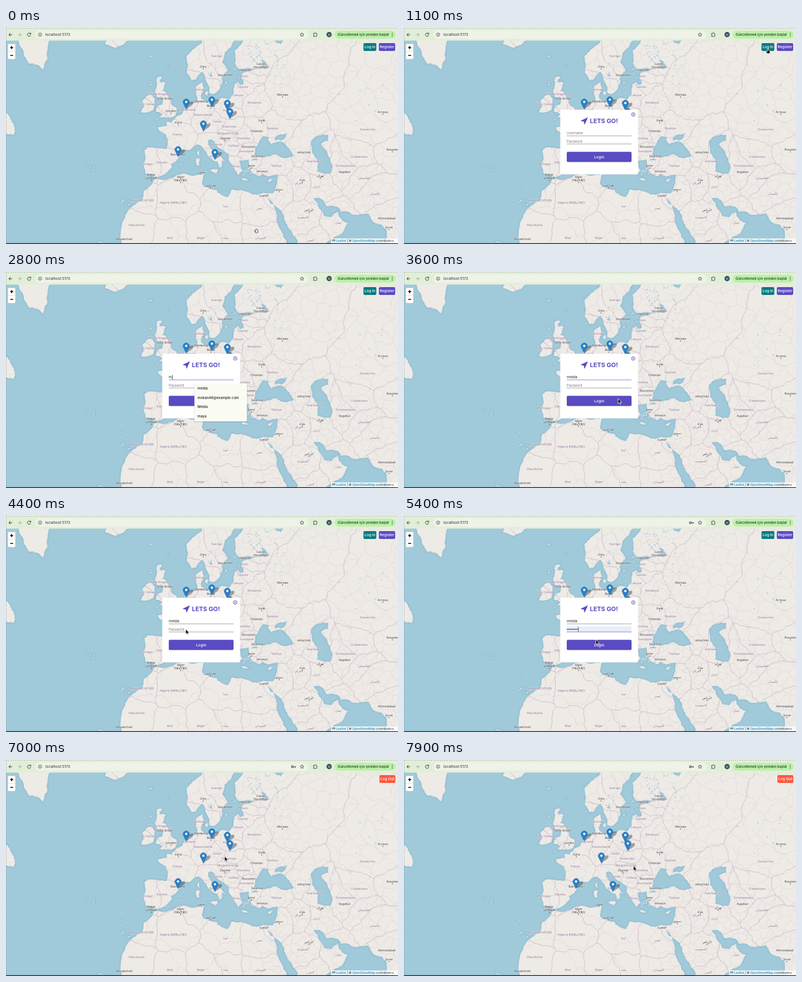
Recreate the animation shown at these times as an HTML page. Size 696 by 386 pixels, loop 8 s.

```html
<!DOCTYPE html>
<html lang="tr">
<head>
<meta charset="utf-8">
<title>Travel map</title>
<style>
html, body { margin: 0; width: 100%; height: 100%; overflow: hidden; background: #a0cada; }
svg { display: block; width: 696px; height: 386px; }
text { font-family: Inter, Roboto, sans-serif; white-space: pre; }
.map text { font-family: "Noto Sans", "DejaVu Sans", sans-serif; text-anchor: middle; paint-order: stroke; stroke: #f6f3f0; stroke-opacity: .6; stroke-width: 1px; }
.land { fill: #eeeae6; fill-rule: evenodd; }
</style>
</head>
<body>
<svg id="stage" viewBox="0 0 696 386"></svg>
<script>
const stage = document.getElementById('stage');

function add(parent, tag, attrs = {}, text) {
  const el = document.createElementNS('http://www.w3.org/2000/svg', tag);
  for (const k in attrs) el.setAttribute(k, attrs[k]);
  if (text !== undefined) el.textContent = text;
  parent.appendChild(el);
  return el;
}
const group = (parent, attrs) => add(parent, 'g', attrs);
const rect = (p, x, y, width, height, fill, rx = 0, more = {}) => add(p, 'rect', { x, y, width, height, fill, rx, ...more });
const line = (p, d, stroke, width = 1, more = {}) => add(p, 'path', { d, stroke, 'stroke-width': width, fill: 'none', ...more });
const label = (p, x, y, size, fill, text, more = {}) => add(p, 'text', { x, y, 'font-size': size, fill, ...more }, text);
const show = (el, on) => el.setAttribute('display', on ? 'inline' : 'none');

function rng(seed) {
  return () => (seed = (seed * 16807) % 2147483647) / 2147483647;
}
const rnd = rng(77);

// Web Mercator
function project(lon, lat) {
  const m = Math.log(Math.tan(Math.PI / 4 + lat * Math.PI / 360)) * 180 / Math.PI;
  return [294 + 5.25 * lon, 469 - 5.25 * m];
}

// midpoint displacement: a plain segment becomes a natural line
function rough(a, b, amp) {
  const dx = b[0] - a[0], dy = b[1] - a[1];
  if (Math.hypot(dx, dy) < 4) return [b];
  const k = (rnd() - .5) * amp;
  const mid = [(a[0] + b[0]) / 2 - dy * k, (a[1] + b[1]) / 2 + dx * k];
  return [...rough(a, mid, amp), ...rough(mid, b, amp)];
}
const toPath = pts => 'M' + pts.map(p => p.map(v => v.toFixed(1)).join(' ')).join('L');

function shape(s, amp = .28) {
  const pts = s.trim().split(/\s+/).map(p => project(...p.split(',').map(Number)));
  return toPath(pts.flatMap((p, i) => rough(p, pts[(i + 1) % pts.length], amp))) + 'Z';
}

// edges between neighbouring Voronoi cells
function voronoi(sites, amp) {
  let d = '';
  sites.forEach((s, i) => {
    let cell = [[-50, -50], [750, -50], [750, 450], [-50, 450]].map(p => ({ p, n: -1 }));
    sites.forEach((o, j) => {
      if (i === j) return;
      const side = q => (q[0] - (s[0] + o[0]) / 2) * (o[0] - s[0]) + (q[1] - (s[1] + o[1]) / 2) * (o[1] - s[1]);
      const next = [];
      cell.forEach((a, k) => {
        const b = cell[(k + 1) % cell.length], u = side(a.p), v = side(b.p);
        if (u <= 0) next.push(a);
        if ((u <= 0) !== (v <= 0)) {
          const f = u / (u - v);
          next.push({ p: [a.p[0] + (b.p[0] - a.p[0]) * f, a.p[1] + (b.p[1] - a.p[1]) * f], n: u <= 0 ? j : a.n });
        }
      });
      cell = next;
    });
    cell.forEach((a, k) => {
      if (a.n > i) d += toPath([a.p, ...rough(a.p, cell[(k + 1) % cell.length].p, amp)]);
    });
  });
  return d;
}

// regions are small in Europe and the Near East, wide in the north-east and the desert
function regionSites() {
  const sites = [];
  for (let i = 0; i < 1500; i++) {
    const x = 215 + rnd() * 500, y = rnd() * 400;
    const middle = Math.exp(-(((x - 420) / 150) ** 2) - ((y - 195) / 75) ** 2);
    const east = x > 470 && y > 225 ? .3 : 0;
    const desert = y > 265 && x < 460;
    if (rnd() < (desert ? .05 : .17 + .45 * middle + east)) sites.push([x, y]);
  }
  return sites;
}

const coast = [
  '12,68 10,64 5,62 5.2,59.3 6.7,58 8.2,58.1 10.5,59.5 11.4,58.4 12.8,55.6 14.2,55.4 16.4,56.5 17,58.6 19,59.8 17.2,61 18,62.7 21.5,64.6 22.5,65.7 25,65.3 21.3,62.9 21.4,60.9 23,59.9 29.8,60 24,59.3 23.6,58.5 24.4,57.3 23.1,57.1 22.6,57.7 21.3,57.2 21,55.4 19.7,54.4',
  '17,54.7 14.3,53.9 11,54 9.9,54.8 10.8,56.4 10.5,57.7 8.2,56.8 8.8,54 5.3,53.2 3.6,51.4 1.6,50.8 0,49.5 -1.7,49.7 -1.6,48.7 -4.7,48.5 -4.4,47.9 -2,46.9 -1.2,45.5 -1.6,43.4 -8,43.7 -9.2,43 -8.8,40.8 -9.4,38.8 -8.9,37 -6.4,36.8',
  '-5.6,36 -2.2,36.8 .1,38.7 -.3,39.5 3.2,42 3.1,43.1 6.2,43.1 8.8,44.4 10.2,43.9 12.2,41.7 15.6,40 16.1,38.5 15.7,37.9 17.1,39 16.9,40.4 18.4,39.9 16.1,41.7 14,42.7 12.4,44.3 12.5,45.5 13.7,45.6 16,43.6 19.4,41.9 19.4,40.4 21.3,38 22.5,36.5 23.9,37.7 22.8,40.3 26.1,40.7',
  '26.2,39.5 27.3,37.1 29.5,36.2 30.7,36.9 32.6,36.1 36,36.7 35.5,33.8 34.2,31.3 31,31.5 29,30.9 23.2,32.3 20.2,32.4 19,30.3 15.5,31.6 15.2,32.4 11,33.3 10.2,34.3 11,37 3,36.8 -2,35.2 -5.5,35.9 -9.4,32 -10,29.5 -13,27.7 -16,23.7 -17,21 -16.4,12 80,12 80,68'
];
const seas = [
  '28,41.4 31.3,41.2 35,42 38.5,41 41.5,41.5 39.8,43.5 36.7,45.2 33.6,44.5 32.6,45.5 33,46.1 30.7,46.4 28.7,44',
  '35,45.4 37,45.4 39.2,47.1 35,46.2', '26.7,40.4 28.5,41 29.3,40.7',
  '47.5,43 47,45 49,46.4 53,46.7 53,45.3 50.5,44.5 52.6,42.6 53.7,40.8 53.8,37 49.2,37.5 49.4,40.3',
  '32.6,29.9 35.5,24 37.3,19.5 40,14 42,12.6 42.7,16.5 39,22 36,27 34.6,28 33.4,28.3',
  '48,30 50.2,30 52.5,27.5 56.6,27 57.2,25.8 66.5,25.3 69,22.3 72.6,20.5 74,13 50,13 52.2,15.6 57.5,18.9 59.7,22.5 56.4,24.6 56.2,26 54,24.1 51.5,24.6 50,26.8',
  '34.8,64.5 37,63.9 38,66 35,66', '31,60 32.8,60.4 30.5,61.6', '34.6,62.4 36,60.9 35.6,62', '12.6,58.8 13.8,58.6 13.6,59.3'
];
const islands = [
  '-5.6,50.1 1.3,51.1 1.7,52.6 .1,53.2 -2,55.8 -3.2,56 -2,57.5 -4,57.7 -3.1,58.6 -5,58.5 -5.6,56 -4.9,54.8 -3.2,54.8 -3.1,53.4 -4.6,53.1 -5.2,51.8 -3,51.4',
  '-6.1,52.2 -5.7,54.5 -7.5,55.3 -10,54.1 -9.2,53.1 -10.2,51.7', '-22.5,63.9 -18.7,63.4 -13.7,65.1 -16,66.5 -22.3,66.4 -24,65 -22,64.5',
  '-54,68 -51.5,64 -48.3,60.9 -43.5,59.9 -42,63 -40,65.2 -32,68', '-57,51.6 -55.5,51.5 -53,48.3 -53.3,46.7 -57,47.5',
  '12.5,38 15.5,38.2 15.1,36.8', '8.2,40.9 9.6,41 9.5,39.2 8.5,39', '9.3,43 9.2,41.4 8.6,42.3', '23.6,35.5 26.2,35.2 24.8,35', '32.4,35 34.5,35.6 33.4,34.7', '11.2,55.6 12.5,56 12,55'
];
// lon, lat, count, spread
const isles = [[25.5, 37.5, 12, 1.8], [-27, 38.4, 6, 1.6], [-15.8, 28.4, 6, 2], [-24, 16, 5, 1], [-6.8, 57.5, 4, .8], [-7, 62, 3, .4], [21, 60, 6, .8], [-1.3, 60.3, 2, .3], [3, 39.5, 3, .9], [18.6, 57.6, 2, .4], [22.6, 58.5, 3, .3], [-17, 32.7, 1, .1]];
const lakes = [[27.5, 62.5, 40, 3], [33, 63.5, 12, 2], [14, 60, 8, 2], [64, 53, 14, 9], [36, 59, 8, 4], [60, 45.6, 3, 1.3]];

function scatter([lon, lat, n, spread]) {
  let d = '';
  for (let i = 0; i < n; i++) {
    const [x, y] = project(lon + (rnd() * 2 - 1) * spread, lat + (rnd() - .5) * spread);
    const r = .6 + rnd();
    d += `M${x - r} ${y}L${x} ${y - r * .8}L${x + r * 1.2} ${y - r * .2}L${x} ${y + r}Z`;
  }
  return d;
}

// "name x y" entries
const parse = s => s.split('|').map(e => {
  const w = e.trim().split(' ');
  return [w.slice(0, -2).join(' '), +w[w.length - 2], +w[w.length - 1]];
});
const countries = parse(`Sverige 374 50|Danmark 343 110|United Kingdom 272 118|Éire / Ireland 251 136|Nederland 323 146|Deutschland 350 155|France 304 190
 |Česko 375 167|Polska 393 147|Slovensko 396 176|Magyarország 394 188|România 422 197|Србија 404 210|Hrvatska 373 208|България 427 220|Ελλάς 408 247
 |Italia 368 229|Türkiye 480 246|Україна 473 179|Беларусь 441 133|Lietuva 412 120|Latvija 421 105|Eesti 423 86|España 277 240|Portugal 249 243
 |Maroc ⵍⵎⵖⵔⵉⴱ 241 308|Algérie ⵍⵣⵣⴰⵢⴻⵔ 297 312|Mauritanie 232 352|Mali 291 375|Niger 346 375|Қазақстан 642 181`);
const eastern = parse(`Oʻzbekiston 627 230|Türkmenistan 603 246|Azərbaycan 549 238|ایران 551 283|العراق 520 277|السعودية 527 338|مصر 450 322|ليبيا 390 318
 |السودان 452 375|افغانستان 636 268|پاکستان 655 296|عمان 590 348|اليمن 541 379|تشاد 390 375`);
const capitals = parse(`Oslo 350 69|Helsinki 425 75|Москва 491 119|Chișinău 445 184|تونس 347 257|دمشق 485 288|თბილისი 529 222|Бишкек 686 217|Ahmedabad 676 340`);
const cities = parse(`Stockholm 389 84|Санкт- 453 64|Петербург 453 70|Hamburg 346 131|Berlin 364 139|London 293 148|Paris 306 169|Zagreb 389 197
 |București 431 212|İstanbul 446 229|İzmir 436 246|Antalya 455 256|Київ 454 165|Астана 669 150|Barcelona 305 226|Rabat 258 262|ⴰⵔⴱⴰⵟ 258 268|Alger 310 266
 |ⴷⵣⴰⵢⴻⵔ 310 272|طرابلس 363 281|القاهرة 458 299|بغداد 526 271|تهران 558 264|الرياض 538 325|Aşgabat 601 257|Nouakchott 210 377|Surat 680 356`);

function drawMap() {
  const g = group(stage, { class: 'map' });
  rect(g, 0, 0, 696, 386, '#a0cada');
  const d = shape(coast.join(' '), .2) + seas.concat(islands).map(s => shape(s)).join('') + isles.map(scatter).join('');
  const clip = add(add(g, 'defs'), 'clipPath', { id: 'shore' });
  add(clip, 'path', { d, 'clip-rule': 'evenodd' });
  const round = { 'stroke-linejoin': 'round' };
  line(g, d, '#90b5cd', 4.6, round);
  line(g, d, '#a0cada', 3.6, round);
  line(g, d, '#86b3c8', .8, round);
  add(g, 'path', { d, class: 'land' });

  const inner = group(g, { 'clip-path': 'url(#shore)' });
  line(inner, voronoi(regionSites(), .5), '#d9ced1', .55);
  add(inner, 'path', { d: lakes.map(scatter).join(''), fill: '#a9cfdc' });
  const nations = [...countries, ...eastern, ...capitals].map(([, x, y]) => [x, y]);
  line(inner, voronoi(nations, .3), '#c0adbf', .7);

  [...countries, ...eastern].forEach(([s, x, y]) => label(g, x, y + 2, 5.5, '#8d7599', s));
  [...capitals, ...cities].forEach(([s, x, y]) => {
    label(g, x, y + 2, 5.4, '#3c3c40', s);
    if (s.length < 7) rect(g, x - .8, y + 3.5, 1.6, 1.6, '#666');
  });
  label(g, 282, 127.5, 5, '#444', 'Great Britain', { 'font-style': 'italic' });
}

function drawPin(x, top) {
  const g = group(stage, { transform: `translate(${x} ${top})` });
  add(g, 'path', { d: 'M0 19L4 9Q8 4 12 6Q14 9 9 13Z', fill: '#333', opacity: .4 });
  add(g, 'path', { d: 'M0 19.3L-4.7 9.4A5.6 5.6 0 1 1 4.7 9.4Z', fill: '#2b80c6', stroke: '#246fae', 'stroke-width': .6 });
  add(g, 'circle', { cy: 6.1, r: 2.1, fill: '#fff' });
}

function button(x, w, fill, text) {
  const g = group(stage);
  rect(g, x, 27, w, 14, fill, 2.2);
  label(g, x + w / 2, 36.4, 6.6, '#fff', text, { 'text-anchor': 'middle', 'font-weight': 500 });
  return g;
}

function drawChrome() {
  const dark = '#35393a';
  rect(stage, 0, 0, 696, 22.5, '#e2efd8');
  rect(stage, 52, 4, 485, 15.5, '#eef2e7', 7.7);
  line(stage, 'M11 12H5M8 9L5 12L8 15', dark);
  line(stage, 'M21 12H27M24 9L27 12L24 15', '#a5a9a4');
  line(stage, 'M43.5 10.2A3 3 0 1 0 44 12.6M44 8.5V10.8H41.6', dark);
  add(stage, 'circle', { cx: 60.5, cy: 11.8, r: 2.9, fill: 'none', stroke: dark, 'stroke-width': .8 });
  line(stage, 'M60.5 11.4V13.4M60.5 10V10.7', dark, .8);
  label(stage, 70, 14, 6.5, '#2b2e2c', 'localhost:5173');
  const star = Array.from({ length: 10 }, (_, i) => {
    const a = i * Math.PI / 5, r = i % 2 ? 1.6 : 3.6;
    return [525.5 + r * Math.sin(a), 12 - r * Math.cos(a)];
  });
  line(stage, toPath(star) + 'Z', dark, .75);
  line(stage, 'M546 9.5H548A1 1 0 0 1 550 9.5H551.5V11.3A1 1 0 0 1 551.5 13.3V15H546V13.3A1 1 0 0 0 546 11.3Z', dark, .9);
  add(stage, 'circle', { cx: 573.7, cy: 11.8, r: 4.7, fill: '#36505b' });
  label(stage, 573.7, 13.6, 4.8, '#dce7ea', 'M', { 'text-anchor': 'middle' });
  rect(stage, 583.5, 5, 108, 14, '#bdf0ab', 7);
  label(stage, 589, 14, 5.9, '#173a18', 'Güncellemek için yeniden başlat', { 'font-weight': 500 });
  for (let i = -1; i < 2; i++) add(stage, 'circle', { cx: 685.8, cy: 11.8 + i * 2.6, r: .75, fill: '#173a18' });
  line(stage, 'M0 .5H696M.5 0V386', '#555', .8, { 'stroke-dasharray': '2 2', opacity: .45 });
  rect(stage, 0, 384.6, 696, 1.4, '#252525');
}

function drawControls() {
  rect(stage, 3, 28, 14, 28, '#fff', 2, { stroke: '#b9b9b5', 'stroke-width': .9 });
  line(stage, 'M3 42H17', '#ccc', .6);
  line(stage, 'M7.2 35H12.8M10 32.2V37.8M7.4 49H12.6', '#000', 1.6);
  rect(stage, 577, 376, 119, 8.6, '#fff', 0, { opacity: .75 });
  rect(stage, 579, 378.2, 5.6, 1.9, '#4c7be1');
  rect(stage, 579, 380.1, 5.6, 1.9, '#ffd500');
  const t = label(stage, 586, 382.4, 5.45, '#333', '');
  [['Leaflet', '#0078a8'], [' | © ', '#333'], ['OpenStreetMap', '#0078a8'], [' contributors', '#333']].forEach(([s, fill]) => add(t, 'tspan', { fill }, s));
}

const violet = '#5a4bc2', grey = '#8b8b8b', focus = '#7468cf';

drawMap();
[[365.5, 122], [320, 126], [393, 128], [397.5, 143], [350.5, 165], [305.5, 211], [371, 216]].forEach(p => drawPin(...p));
drawChrome();
drawControls();

const keyIcon = group(stage);
add(keyIcon, 'circle', { cx: 508.5, cy: 12, r: 1.7, fill: 'none', stroke: '#35393a', 'stroke-width': 1.1 });
line(keyIcon, 'M510.3 12H514.6M513.5 12V13.8', '#35393a', 1.1);

const logIn = button(634.7, 22.8, '#087a80', 'Log In');
const register = button(662, 29, violet, 'Register');
const logOut = button(663, 28.3, '#ff583e', 'Log Out');

const modal = group(stage);
rect(modal, 277.5, 146, 138, 115.5, '#fff', 2.5);
add(modal, 'circle', { cx: 407, cy: 154.5, r: 3.2, fill: 'none', stroke: violet, 'stroke-width': .9 });
line(modal, 'M405.7 153.2L408.3 155.8M408.3 153.2L405.7 155.8', violet, .9);
add(modal, 'path', { d: 'M326 160.3L320.6 172.3L319.6 167L314.2 165.8Z', fill: violet, stroke: violet, 'stroke-width': .7, 'stroke-linejoin': 'round' });
label(modal, 330, 170, 10.9, violet, 'LETS GO!', { 'font-weight': 700 });
const passFill = rect(modal, 289, 197.3, 115, 9.8, '#e7eefb');
const userLine = line(modal, 'M289 192.8H404', grey, .8);
const passLine = line(modal, 'M289 207.2H404', grey, .8);
const user = label(modal, 289, 190.4, 6.3, '#222', '');
const passHint = label(modal, 289, 204.8, 5.9, '#757575', 'Password');
const dots = group(modal);
for (let i = 0; i < 8; i++) add(dots, 'circle', { cx: 290.3 + i * 2.5, cy: 202.4, r: .95, fill: '#222' });
const caret = rect(modal, 289, 184, .7, 8.4, '#111');
rect(modal, 289, 221.3, 115, 18.3, violet, 2);
label(modal, 346.5, 232.9, 6.8, '#fff', 'Login', { 'text-anchor': 'middle', 'font-weight': 500 });

const entries = ['melda', 'mokan48@example.com', 'Melda', 'maya', 'selin', 'tarik'];
const rowHeight = 16.55;
const menu = group(stage);
const menuShade = rect(menu, 333.8, 199.5, 94.8, 69, '#000', 2, { opacity: .13 });
const menuBox = rect(menu, 334.5, 199, 93.3, 68, '#fafcf3', 2);
const rows = entries.map((_, i) => label(menu, 340, 210.2 + i * rowHeight, 6.2, '#1d201d', '', { 'font-weight': 500 }));

// path, fill, stroke
const looks = {
  arrow: ['M0 0V9.4L2.2 7.4L3.6 10.6L5.1 10L3.7 6.9H6.6Z', '#111', '#fff'],
  hand: ['M-3 .6L-2 .2L-1 1.6V-2Q-.5 -2.8 0 -2V-2.5Q.7 -3.3 1.3 -2.3V-2Q2 -2.7 2.5 -1.7V-.8Q3.3 -1.3 3.5 -.3V2L2.5 4H-1Z', '#eeece9', '#333'],
  point: ['M0 0Q1 -.6 1.5 .3V3.4L5 4.4V7L4 9.8H0L-3 5.8L-2 5L0 6.2Z', '#1b1b1b', '#eee'],
  beam: ['M-1.5 -4H1.5M0 -4V4M-1.5 4H1.5', 'none', '#222']
};
const cursor = group(stage);
const pointers = Object.entries(looks).map(([name, [d, fill, stroke]]) =>
  [name, add(cursor, 'path', { d, fill, stroke, 'stroke-width': .8, 'stroke-linejoin': 'round' })]);

// time, x, y, pointer shape from that time on
const moves = [
  [0, 444, 362, 'hand'], [900, 645, 36, 'point'], [1200, 645, 36, 'arrow'], [2100, 306, 189, 'beam'], [2800, 306, 189, ''],
  [3600, 380, 226, 'arrow'], [3900, 319, 202, 'arrow'], [4600, 319, 202, 'arrow'], [5000, 336, 237, 'arrow'], [5300, 340.5, 220.5, 'arrow'],
  [5500, 340.5, 220.5, 'arrow'], [5700, 342, 231, 'point'], [6000, 342.5, 234, 'hand'], [6400, 342.5, 234, 'arrow'], [7300, 404, 150, 'arrow'],
  [7700, 407.3, 188.8, 'arrow'], [8000, 407.3, 188.8, 'arrow']
];

function placeCursor(t) {
  const i = moves.findIndex((m, n) => t >= m[0] && t < moves[n + 1][0]);
  const [t0, x0, y0, look] = moves[i], [t1, x1, y1] = moves[i + 1];
  const u = (t - t0) / (t1 - t0), e = u * u * (3 - 2 * u);
  cursor.setAttribute('transform', `translate(${x0 + (x1 - x0) * e} ${y0 + (y1 - y0) * e})`);
  pointers.forEach(([name, el]) => show(el, name === look));
}

function drawMenu(t, typed) {
  show(menu, t >= 2200 && t < 3300);
  const hits = entries.filter(s => s.toLowerCase().startsWith(typed));
  rows.forEach((r, i) => r.textContent = hits[i] || '');
  const h = hits.length * rowHeight + 1.8;
  menuBox.setAttribute('height', h);
  menuShade.setAttribute('height', h + 1);
}

function render(now) {
  const t = Math.floor(now % 8000 / 100) * 100;
  const logged = t >= 6000, filled = t >= 5000;
  const typed = t < 2800 ? '' : entries[0].slice(0, 1 + (t - 2800) / 100);
  show(modal, t >= 1100 && !logged);
  show(logIn, !logged);
  show(register, !logged);
  show(logOut, logged);
  show(keyIcon, filled);

  user.textContent = typed || 'Username';
  user.setAttribute('fill', typed ? '#222' : '#757575');
  user.setAttribute('font-size', typed ? 6.5 : 5.9);
  const onUser = t >= 2100 && t < 3900, onPass = t >= 4600;
  userLine.setAttribute('stroke', onUser ? focus : grey);
  passLine.setAttribute('stroke', onPass ? focus : grey);
  show(passFill, filled);
  show(dots, filled);
  show(passHint, !filled);

  show(caret, (t >= 2100 && t < 2600) || (t >= 2800 && t < 3600) || onPass);
  const end = typed && !onPass ? user.getComputedTextLength() + .3 : filled ? 20.3 : 0;
  caret.setAttribute('x', 289 + end);
  caret.setAttribute('y', onPass ? 198.2 : 184);

  drawMenu(t, typed);
  placeCursor(t);
}

const start = performance.now();
function tick() {
  render(performance.now() - start);
  requestAnimationFrame(tick);
}
tick();
</script>
</body>
</html>
```
